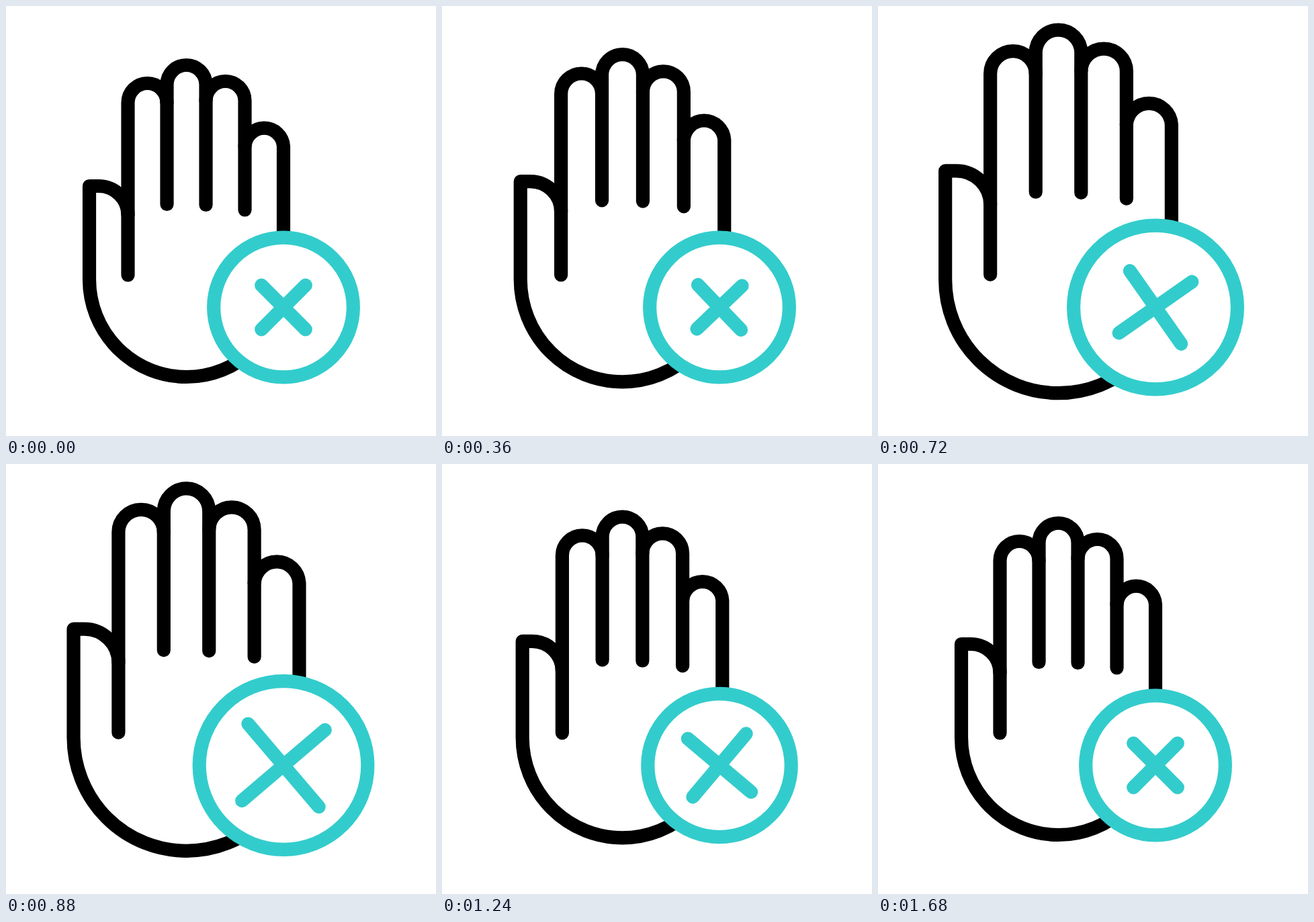
An HTML page for the animation above (1.88 s loop, 640x640 px).

```html
<!DOCTYPE html>
<html lang="en">
<head>
<meta charset="utf-8">
<title>Hand stop</title>
<style>
  html, body { margin: 0; width: 640px; height: 640px; overflow: hidden; background: #fff; }
  svg { display: block; }
  path, circle {
    fill: none;
    stroke-width: 20.2;
    stroke-linecap: round;
    stroke-linejoin: round;
    vector-effect: non-scaling-stroke;
  }
  #hand path { stroke: #000; }
  .badge { stroke: #3cc; }
  circle.badge { fill: #fff; }
</style>
</head>
<body>
<svg width="640" height="640" viewBox="0 0 640 640">
  <g id="hand">
    <path d="M181.5 400.5V311A43.5 43 0 0 0 138 268H124V407A144.5 145 0 0 0 413 407V209A28.8 29 0 0 0 355.5 209"/>
    <path d="M181.5 311V144A29 29 0 0 1 239.5 144"/>
    <path d="M239.5 295V117A29 29 0 0 1 297.5 117V296"/>
    <path d="M297.5 141A29 29 0 0 1 355.5 141V303.5"/>
  </g>
  <circle id="ring" class="badge" cx="413" cy="448.5" r="103.85"/>
  <path id="cross" class="badge" d="M-32.8 -32.8L32.8 32.8M32.8 -32.8L-32.8 32.8"/>
</svg>
<script>
  const LOOP = 1880, STEP = 40, LAST = 1680;
  const [hand, ring, cross] = ['hand', 'ring', 'cross'].map(id => document.getElementById(id));

  // Eased progress from 0 to 1 between times a and b
  const ease = (t, a, b) => {
    const x = Math.min(1, Math.max(0, (t - a) / (b - a)));
    return x * x * x * (10 - 15 * x + 6 * x * x);
  };
  // Rises from a to b, falls back from c to d
  const pulse = (t, a, b, c, d) => ease(t, a, b) - ease(t, c, d);

  function draw(t) {
    const handScale = 1 + 0.165 * pulse(t, 120, 733, 800, 1440);
    const grow = 1 + 0.207 * pulse(t, 390, 860, 900, 1370);
    const crossScale = grow * (1 + 0.48 * pulse(t, 480, 985, 975, 1575));
    const turn = 10 * ease(t, 240, 680) - 15 * ease(t, 680, 1150) + 5 * ease(t, 1180, 1640);

    hand.setAttribute('transform',
      `translate(268.5 405.5) scale(${handScale}) translate(-268.5 -405.5)`);
    ring.setAttribute('r', 103.85 * grow);
    cross.setAttribute('transform',
      `translate(413 448.5) rotate(${turn}) scale(${crossScale})`);
  }

  // The motion runs at 25 steps per second and rests at the end of the loop
  const start = performance.now();
  function tick() {
    const t = (performance.now() - start) % LOOP;
    draw(Math.min(LAST, Math.floor(t / STEP) * STEP));
    requestAnimationFrame(tick);
  }
  tick();
</script>
</body>
</html>
```
